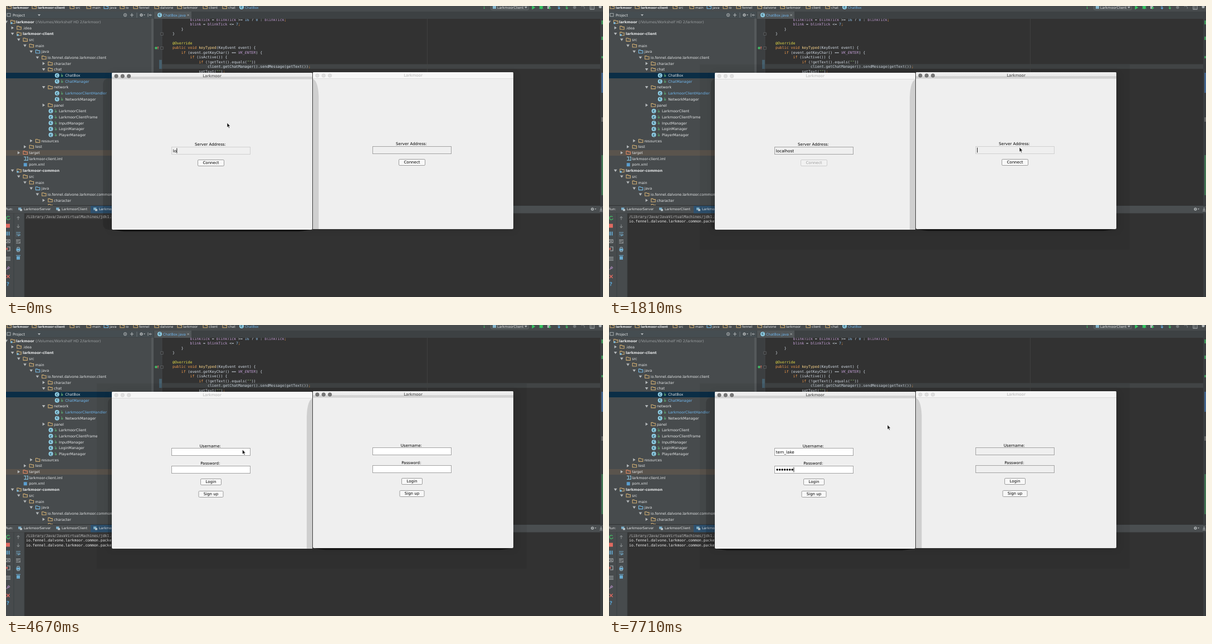
An HTML page that plays this animation: 1072x523 px, repeating every 8 s.

```html
<!DOCTYPE html>
<html lang="en">
<head>
<meta charset="utf-8">
<title>Chat client login</title>
<style>
html, body { margin: 0; width: 100%; height: 100%; overflow: hidden; background: #323232; }
svg { display: block; width: 1072px; height: 523px; }
text { font: 6.45px "DejaVu Sans", sans-serif; fill: #e6e8e9; white-space: pre; }
.b { font-weight: bold; }
.nav { font-size: 5.85px; }
.nav.b { font-size: 5.65px; }
.tab { font-size: 6px; }
.code { font: 6.54px "DejaVu Sans Mono", monospace; fill: #d6dfe8; }
.k { fill: #f09a4c; } .a { fill: #e6de46; } .m { fill: #ffd88c; }
.n { fill: #8fc0ea; } .s { fill: #8db573; } .p { fill: #c39fd6; }
.i { font-style: italic; }
.ui { font-size: 7.05px; fill: #000; }
.typed { font-size: 7.2px; fill: #000; }
.mid { text-anchor: middle; }
</style>
</head>
<body>
<svg id="stage" viewBox="0 0 1072 523" xmlns="http://www.w3.org/2000/svg">
<defs>
<filter id="soft" x="-20%" y="-20%" width="140%" height="140%"><feGaussianBlur stdDeviation="7"/></filter>
<linearGradient id="bar" x1="0" y1="0" x2="0" y2="1">
<stop offset="0" stop-color="#f0f0f0"/><stop offset=".56" stop-color="#ebebeb"/>
<stop offset=".58" stop-color="#d4d4d4"/><stop offset="1" stop-color="#d2d2d2"/>
</linearGradient>
</defs>
</svg>
<script>
const stage = document.getElementById('stage');
const PANEL = '#474b4d', EDITOR = '#323232', BLUE = '#70b8f0', TAN = '#d0ae74', JAVA = '#78bde8';
const GREEN = '#45b864', RED = '#e06a60', GREY = '#b0b5b7', CLS = 'class';

function el(tag, attrs, parent = stage, content) {
  const e = document.createElementNS('http://www.w3.org/2000/svg', tag);
  for (const k in attrs) e.setAttribute(k, attrs[k]);
  if (content !== undefined) e.textContent = content;
  parent.appendChild(e);
  return e;
}
const rect = (x, y, width, height, fill, parent, more) => el('rect', { x, y, width, height, fill, ...more }, parent);
const text = (x, y, s, cls = '', parent, more) => el('text', { x, y, class: cls, ...more }, parent, s);
const line = (d, stroke, w = 1, parent) => el('path', { d, stroke, 'stroke-width': w, fill: 'none' }, parent);
const shape = (d, fill, parent) => el('path', { d, fill }, parent);
const dot = (cx, cy, r, fill, parent) => el('circle', { cx, cy, r, fill }, parent);
const show = (e, on) => e.setAttribute('display', on ? 'inline' : 'none');

function folder(x, y, color) {
  line(`M${x} ${y + 2.8}V${y - 2.8}H${x + 3}L${x + 4} ${y - 1.6}H${x + 7.4}V${y + 2.8}Z`, color, 1.1);
}
function classIcon(x, y) {
  dot(x, y, 4, '#92d0e6');
  text(x, y + 2, 'C', 'b mid', stage, { style: 'font-size:5.6px;fill:#24485a' });
}
function arrow(x, y, open) {
  shape(open ? `M${x - 2.8} ${y - 2}h5.6l-2.8 4.4z` : `M${x - 2} ${y - 2.8}v5.6l4.4 -2.8z`, '#b4b8ba');
}
function gear(x, y) {
  dot(x, y, 2.6, GREY); dot(x, y, 1, PANEL);
  shape(`M${x + 4} ${y - 1}h3l-1.5 2z`, GREY);
}

// Toolbar and breadcrumbs
rect(0, 0, 1072, 523, EDITOR);
rect(0, 0, 1072, 10, PANEL);
const crumbs = [[12, 'larkmoor', 1], [57, 'larkmoor-client', 1], [125, 'src'], [155, 'main'], [186, 'java'], [215, 'io'],
  [239, 'fennel'], [277, 'dalvone'], [318, 'larkmoor'], [364, 'client'], [399, 'chat']];
crumbs.forEach(([x, s, bold], i) => {
  folder(x - 10, 2, i === 4 ? JAVA : TAN);
  text(x, 4.8, s, bold ? 'nav b' : 'nav');
});
classIcon(423, 2);
text(429, 4.8, 'ChatBox', 'nav', stage, { style: 'fill:' + BLUE });
text(856, 5, '↓', 'b', stage, { style: 'fill:' + GREEN });
rect(870.5, -3, 68, 10, '#505557', stage, { rx: 2, stroke: '#686d6f', 'stroke-width': .7 });
rect(874, 0, 6, 5, '#86b7ce');
text(882, 5, 'LarkmoorClient', '', stage, { style: 'font-size:6.2px' });
shape('M931 1h5l-2.5 3.4z', GREY);
shape('M944.5 -1v7.5l6 -3.8z', '#35c560');
dot(961, 2.5, 3, '#35c560');
line('M957 0l8 5M957 5l8 -5', '#35c560', .8);
rect(972, 0, 5, 5, GREY); shape('M975 1v5l4 -2.5z', '#35c560');
[[993, '#5fa8d8'], [1007, GREEN]].forEach(([x, c]) => line(`M${x - 3} 0h2M${x} -1v6l-2 -2m2 2l2 -2`, c, 1.2));
dot(1021, 2.5, 2.8, '#727779');
line('M1038 5a3 3 0 0 0 -5 -3.5', '#727779', 1.2);
rect(1049, -1, 7, 7, 'none', stage, { stroke: GREY });
line('M1052 -1v7', GREY, .8);
dot(1067, 1.5, 2.5, GREY);

// Project header
rect(0, 10, 265, 12.5, '#454d51');
rect(2, 13.3, 6, 5.4, 'none', stage, { stroke: GREY, 'stroke-width': .9 });
text(12, 18.5, 'Project');
shape('M57 15h5l-2.5 3.2z', GREY);
el('circle', { cx: 214, cy: 16.2, r: 2.7, fill: 'none', stroke: GREY }); dot(214, 16.2, 1, GREY);
line('M223 16.2h6M226 13v6.4', GREY, 1.1);
line('M235 12v9', '#7b8386', .8);
gear(243, 16.2);
line('M255 13.4v6M257 16.3h5m-2.5 -1.6l-2 1.6l2 1.6', GREY, .9);

// Project tree
rect(0, 22.5, 265, 336, PANEL);
rect(261, 22.5, 4, 336, '#55595b');
rect(0, 120, 265, 10, '#0b2e46');
rect(0, 259, 261, 10, '#5a544d');
// level, label, kind or folder colour, open, style
const rows = [
  [0, 'larkmoor', TAN, 1, 'b'], [1, '.idea', TAN, 0], [1, 'larkmoor-client', TAN, 1, 'b'], [2, 'src', TAN, 1],
  [3, 'main', TAN, 1], [4, 'java', JAVA, 1], [5, 'io.fennel.dalvone.larkmoor.client', TAN, 1], [6, 'character', TAN, 0],
  [6, 'chat', TAN, 1], [7, 'ChatBox', CLS], [7, 'ChatManager', CLS, 0, BLUE], [6, 'network', TAN, 1],
  [7, 'LarkmoorClientHandler', CLS, 0, BLUE], [7, 'NetworkManager', CLS], [6, 'panel', TAN, 0],
  [6, 'LarkmoorClient', CLS], [6, 'LarkmoorClientFrame', CLS], [6, 'InputManager', CLS], [6, 'LoginManager', CLS],
  [6, 'PlayerManager', CLS], [4, 'resources', TAN, 0], [3, 'test', TAN, 0], [2, 'target', '#e58a66', 0],
  [2, 'larkmoor-client.iml', 'file'], [2, 'pom.xml', 'build'], [1, 'larkmoor-common', TAN, 1, 'b'], [2, 'src', TAN, 1],
  [3, 'main', TAN, 1], [4, 'java', JAVA, 1], [5, 'io.fennel.dalvone.larkmoor.common', TAN, 1], [6, 'character', TAN, 0]
];
rows.forEach(([level, label, kind, open, style], i) => {
  const y = 28.5 + 10.69 * i, isClass = kind === CLS;
  let x = 30 + 11.2 * (level - 1) + (isClass ? 9 : 0);
  if (isClass) {
    classIcon(x - 14.5, y);
    dot(x - 5.6, y + .8, 1.7, '#5fae74'); dot(x - 5.6, y + .8, .7, PANEL);
    line(`M${x - 7.4} ${y - 2.2}h2`, '#5fae74', .9);
  } else if (kind === 'file') {
    line(`M${x - 9} ${y - 3}h3v6h-3M${x - 4} ${y - 3}h2v6h-3`, '#89bfd8', 1.2);
  } else if (kind === 'build') {
    rect(x - 9.5, y - 2.8, 6, 6, '#5b9fd0');
  } else {
    arrow(x - 18.4, y, open);
    folder(x - 10.2, y, kind);
    if (style === 'b') rect(x - 10.4, y + .8, 3, 3, JAVA);
  }
  if (level === 0) x = 18;
  const t = text(x, y + 2.4, label, style === 'b' ? 'b' : '');
  if (style === BLUE) t.style.fill = BLUE;
});
text(53, 30.9, '(/Volumes/Workshelf HD 2/larkmoor)', '', stage, { style: 'fill:#9ca0a2' });
folder(76, 359.3, TAN);

// Editor
rect(265, 22.5, 15, 336, '#3c3f41');
rect(280, 104.5, 789, 8.4, '#414445');
rect(275, 96.8, 5, 16.2, '#46606e');
line('M756.5 22.5v336', '#444', .8);
line('M280 22.5v336', '#4b4f51', .6);
[50, 75.5].forEach(y => rect(277.8, y - 2, 4.4, 4.4, EDITOR, stage, { stroke: '#6a6e70', 'stroke-width': .7 }));
dot(269.5, 75.5, 2.3, GREEN); line('M273 78v-5m-1 1.5l1 -1.5l1 1.5', RED, .9);
const code = [
  [0, 8, 'p:blinkTick', ' = ', 'p:blinkTick', ' >= ', 'n:16', ' ? ', 'n:0', ' : ', 'p:blinkTick', 'k:;'],
  [1, 8, 'p:blink', ' = ', 'p:blinkTick', ' <= ', 'n:7', 'k:;'],
  [2, 4, '}'], [3, 0, '}'], [5, 0, 'a:@Override'],
  [6, 0, 'k:public void ', 'm:keyTyped', '(KeyEvent event) {'],
  [7, 4, 'k:if ', '(event.getKeyChar() == ', 'p i:VK_ENTER', ') {'],
  [8, 8, 'k:if ', '(isActive()) {'],
  [9, 12, 'k:if ', '(!getText().equals(', 's:""', '))'],
  [10, 16, 'client', '.getChatManager().sendMessage(getText())', 'k:;'],
  [11, 12, 'setText(', 's:""', ')', 'k:;']
];
for (const [row, indent, ...parts] of code) {
  const t = text(299 + indent * 3.937, 26.9 + row * 8.42, undefined, 'code');
  for (const part of parts) {
    const m = /^([kamnsp](?: i)?):(.+)$/.exec(part);
    el('tspan', m ? { class: m[1] } : {}, t, m ? m[2] : part);
  }
}
rect(1067, 22.5, 5, 336, '#3b3e40');
[[26, 7, GREEN], [55, 6, GREEN], [90, 4, GREEN], [120, 36, '#4674ad'], [200, 8, '#777'], [268, 72, '#45895a']].forEach(([y, h, c]) => rect(1069.5, y, 2, h, c));

// Editor tab, over the first clipped code line
rect(265, 10, 807, 13, '#3d4143');
rect(266, 10, 67, 13, '#515658');
classIcon(276, 16.3);
text(282, 18.6, 'ChatBox.java', '', stage, { style: 'font-size:6.2px;fill:' + BLUE });
line('M325.4 14.6l3.4 3.4m0 -3.4l-3.4 3.4', GREY, .8);

// Run panel
rect(0, 358.5, 1072, 14, '#4a4e50');
line('M0 358.5H1072', '#2c2f30', .8);
rect(152, 359, 70, 13.5, '#2f5270');
text(-1, 367.3, 'Run:', 'tab');
[[32, 'LarkmoorServer'], [100, 'LarkmoorClient'], [167, 'LarkmoorClient']].forEach(([x, s]) => {
  rect(x - 10, 362.3, 5.4, 4.4, '#79adc8'); rect(x - 7, 365, 4, 3.4, '#bac4c8');
  text(x, 367.3, s, 'tab');
});
gear(1053, 365);
line('M1068.5 362v5m-2 -2l2 2l2 -2M1066 368.4h5', GREY, .9);
rect(0, 372.5, 33, 151, PANEL);
line('M14 372.5V523M33 372.5V523', '#393d3f', .8);
rect(1067, 372.5, 5, 151, '#3b3e40');
line('M6.5 379a3.2 3.2 0 1 0 .6 3', GREEN, 1.3);
rect(0, 391.5, 7, 7, RED);
rect(1, 405.5, 2, 7, '#65a8cf'); rect(4.5, 405.5, 2, 7, '#65a8cf');
rect(0, 420, 7, 5.5, 'none', stage, { stroke: GREY }); dot(3.6, 422.7, 1.3, GREY);
line('M2 433h5v7h-5', GREY, 1.1); line('M-1 436.5h4m-2 -2l2 2l-2 2', RED, 1.1);
line('M0 451.5h8M0 454.3h8M0 457h8', GREY, 1.1);
line('M1 474l2.4 -2.4M2.5 469.6l3 3M4 468l3 3', '#a686b5', 1.4);
line('M1 483.3l5.6 5.6m0 -5.6l-5.6 5.6', RED, 1.4);
text(.8, 502.8, '?', 'b', stage, { style: 'font-size:9px;fill:#5aa6d6' });
line('M22 384.5v-6m-2.3 2.3l2.3 -2.3l2.3 2.3M22 392.5v6m-2.3 -2.3l2.3 2.3l2.3 -2.3', '#858a8c', 1.1);
line('M18 407h8M18 410h7v2.5h-4m1.5 -1.5l-1.5 1.5l1.5 1.5M18 413h1', '#74abc9', 1);
line('M18 420.5h8M18 423h5M18 426h8M25 422.5v3', GREY, 1);
rect(18.5, 436, 7, 3.8, '#68a9ce'); line('M20 436v-2.2h4v2.2M20 438v3.5h4v-3.5', '#a8cbdc', .9);
rect(19, 449.8, 6, 6, '#68a9ce'); line('M18 448.3h8', '#68a9ce', 1.1);
rect(35.5, 374.6, 156, 8.4, '#3d3d3d');
text(36, 381, '/Library/Java/JavaVirtualMachines/jdk1.8', 'code', stage, { style: 'fill:#b8b8b8' });
const logs = [389.2, 397.6].map(y => text(36, y, 'io.fennel.dalvone.larkmoor.common.packets', 'code', stage, { style: 'fill:#f2f2f2' }));

// Window shadows
const halo = rect(163, 105, 772, 333, '#000', stage, { opacity: .06 });
rect(188, 122, 725, 280, '#000', stage, { opacity: .12, filter: 'url(#soft)' });
const glow = rect(174, 130, 30, 272, '#000', stage, { opacity: .14, rx: 10 });
const streak = shape('M192 401H548Q540 404 526 405.2H212Q198 404 192 401Z', '#151515');

function makeField(parent, y) {
  const box = rect(297.5, y, 141, 13, '#fff', parent);
  const part = rect(298, y + .5, 87, 12, '#fff', parent);
  const label = text(299.8, y + 9, '', 'typed', parent);
  const dots = Array.from({ length: 7 }, (_, i) => dot(302.1 + 4.5 * i, y + 6.6, 1.75, '#000', parent));
  const caret = rect(0, y + 2, 1, 9, '#222', parent);
  return (value, { fill = 'white', focus = false, secret = 0 } = {}) => {
    box.setAttribute('fill', fill === 'white' ? '#fff' : '#efefef');
    box.setAttribute('stroke', fill === 'faint' ? '#d0d0d0' : '#a2a2a2');
    show(part, fill === 'half');
    label.textContent = value;
    dots.forEach((d, i) => show(d, i < secret));
    show(caret, focus);
    const width = secret ? secret * 4.5 : value ? label.getComputedTextLength() : 0;
    caret.setAttribute('x', 299.9 + width);
  };
}
function makeButton(parent, y, w, label) {
  const box = rect(368 - w / 2, y, w, 11, '#f8f8f8', parent, { rx: 1.6 });
  const name = text(368, y + 7.9, label, 'ui mid', parent);
  return on => {
    box.setAttribute('stroke', on ? '#9c9c9c' : '#cdcdcd');
    box.setAttribute('fill', on ? '#f8f8f8' : '#f1f1f1');
    name.style.fill = on ? '#000' : '#a0a0a0';
  };
}
function makeWindow(dx, dy, shade) {
  const g = el('g', { transform: `translate(${dx} ${dy})` });
  rect(190, 120, 360, 282, '#efefef', g, { rx: 2 });
  const bar = shape('M190 132V122q0 -2 2 -2H548q2 0 2 2V132Z', '#f6f6f6', g);
  line('M190 131.5H550', '#dcdcdc', 1, g);
  const lights = [198, 209.3, 220.6].map(x => el('circle', { cx: x, cy: 126, r: 3.2, 'stroke-width': .6 }, g));
  const title = text(370, 128.4, 'Larkmoor', 'ui mid', g);
  const cast = shape(shade, '#cfcfcf', g);
  const server = el('g', {}, g), login = el('g', {}, g);
  text(367, 251, 'Server Address:', 'ui mid', server);
  const address = makeField(server, 253.5), connect = makeButton(server, 276.5, 47, 'Connect');
  text(366.8, 219.6, 'Username:', 'ui mid', login);
  text(366.8, 251, 'Password:', 'ui mid', login);
  const user = makeField(login, 221.5), pass = makeField(login, 253.5);
  makeButton(login, 276.5, 37, 'Login')(true);
  makeButton(login, 298.5, 44, 'Sign up')(true);
  return {
    address, connect, user, pass,
    update(active, loggedOn) {
      bar.setAttribute('fill', active ? 'url(#bar)' : '#f6f6f6');
      lights.forEach(c => {
        c.setAttribute('fill', active ? '#777' : '#e0e0e0');
        c.setAttribute('stroke', active ? '#5a5a5a' : '#cfcfcf');
      });
      title.style.fill = active ? '#333' : '#b5b5b5';
      show(cast, !active);
      show(server, !loggedOn);
      show(login, loggedOn);
    }
  };
}
rect(550, 120, 1, 282, '#3a3a3a');
const left = makeWindow(0, 0, 'M550 132Q541 136 540 164V402H550Z');
const right = makeWindow(361, -1, 'M190 132Q199.5 136 200.5 164V402H190Z');

const pointer = el('path', { d: 'M0 0V8.2L1.9 6.4L3.3 9.5L4.6 8.9L3.2 5.9H5.7Z', fill: '#111', stroke: '#fff', 'stroke-width': .55 });

// Stepped timelines: [start, value]
const HOST = 'localhost', NAME = 'tern_lake';
const leftHost = [[0, 2], [150, 5], [450, 7], [600, 9]];
const rightHost = [[0, 0], [2760, 1], [2900, 2], [3050, 4], [3200, 5], [3340, 7], [3490, 8], [3640, 9]];
const name = [[0, 0], [4970, 1], [5170, 2], [5320, 3], [5470, 4], [6060, 5], [6360, 8], [6660, 9]];
const secret = [[0, 0], [6960, 1], [7110, 2], [7260, 3], [7410, 4], [7560, 5], [7710, 7]];
const path = [[0, [397, 210]], [1040, [432, 196]], [1210, [560, 214]], [1360, [680, 246]], [1510, [730, 259]],
  [1810, [737, 254]], [1960, [738.7, 252.6]], [4080, [715, 240]], [4230, [625, 206]], [4380, [510, 193]],
  [4530, [434, 214]], [4670, [424.5, 224]], [4970, [460, 200]], [5170, [500, 179.5]]];
const at = (steps, t) => steps.reduce((v, [start, value]) => t >= start ? value : v, steps[0][1]);

function draw() {
  const t = performance.now() % 8000;
  const leftActive = t < 1810 || t >= 4820;
  left.update(leftActive, t >= 2460);
  right.update(!leftActive, t >= 4670);

  left.address(HOST.slice(0, at(leftHost, t)), {
    fill: t < 1040 ? 'faint' : t < 1810 ? 'white' : 'grey', focus: leftActive
  });
  left.connect(t < 740);
  right.address(HOST.slice(0, at(rightHost, t)), {
    fill: t < 1510 ? 'grey' : t < 1810 ? 'half' : 'faint',
    focus: t >= 1810 && !(t >= 2320 && t < 2610)
  });
  right.connect(t < 3780);

  left.user(NAME.slice(0, at(name, t)), { focus: t >= 4820 && t < 6810 && !(t >= 5910 && t < 6060) });
  left.pass('', { fill: t >= 4820 && t < 6810 ? 'grey' : 'white', focus: t >= 6810, secret: at(secret, t) });
  const idle = { fill: t < 4820 ? 'white' : 'grey' };
  right.user('', idle);
  right.pass('', idle);

  show(logs[0], t >= 1210);
  show(logs[1], t >= 2460);
  show(halo, t >= 1810);
  glow.setAttribute('x', leftActive ? 174 : 183);
  streak.setAttribute('transform', leftActive ? '' : 'translate(361 -1)');
  pointer.setAttribute('transform', `translate(${at(path, t).join(' ')})`);
  requestAnimationFrame(draw);
}
draw();
</script>
</body>
</html>
```
